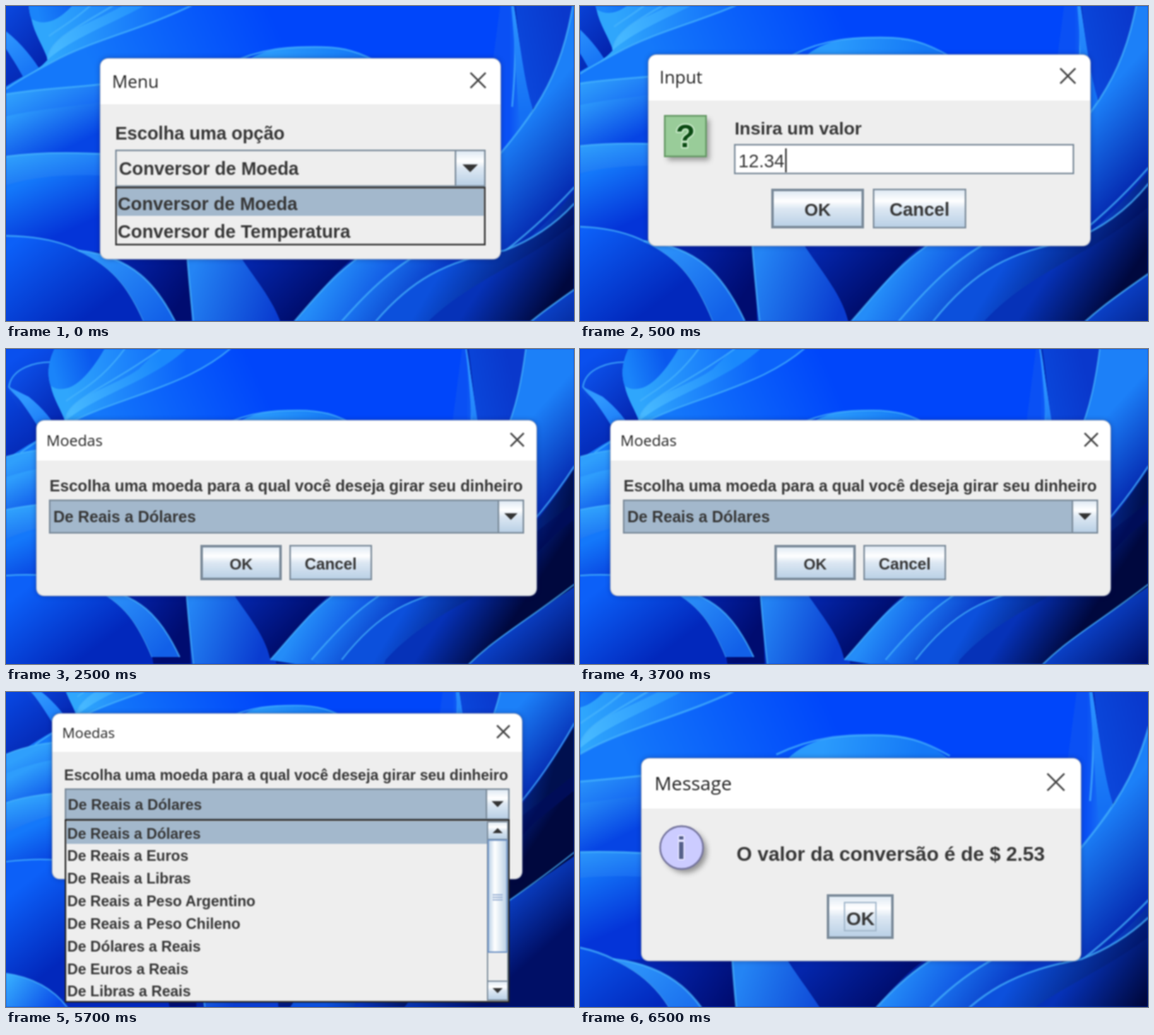
These frames come from a looping animation (900x500 px, 8 s). An HTML page:

```html
<!DOCTYPE html>
<html lang="pt">
<head>
<meta charset="utf-8">
<title>Conversor</title>
<style>
  html, body { margin: 0; width: 100%; height: 100%; overflow: hidden; background: #0440e0; }
  svg { display: block; width: 900px; height: 500px; filter: blur(.8px); }
  text { fill: #373737; font-family: "Liberation Sans", Arial, sans-serif; font-weight: 700; }
  .title { fill: #222; font-family: "Open Sans", sans-serif; font-weight: 400; }
  .plain { font-weight: 400; }
  .mid { text-anchor: middle; }
  .halo { paint-order: stroke; stroke-linejoin: round; }
</style>
</head>
<body>
<svg id="stage" viewBox="0 0 900 500" xmlns="http://www.w3.org/2000/svg"></svg>
<script>
const BORDER = '#7a8a99', PICK = '#a3b8cc', PANEL = '#eeeeee';

// Wallpaper petals: [outline, lit edge, gradient x1 y1 colour, x2 y2 colour]
const petals = [
  ['M-90 -70H100C50 10 60 60 80 130L-90 170Z', '',
    -40, -20, '#0a50ee', 60, 120, '#0424ae'],
  ['M-40 25C-30 -15 20 -25 60 -20L75 120H45C0 90 -20 60 -40 25Z', 'M60 -22C10 -28 -32 -10 -36 22C-15 50 25 75 55 108',
    -30, 0, '#0c4fe8', 60, 90, '#0424ae'],
  ['M-36 22L0 40C25 60 45 85 58 108L30 118C15 90 -10 50 -36 22Z', '',
    0, 40, '#2f98ff', 50, 110, '#1470f4'],
  ['M-90 190C-20 135 30 110 75 85C150 40 290 20 380 -70H792C812 20 815 100 800 300H-90Z', '',
    150, 130, '#1478fa', 420, 10, '#0046fa'],
  ['M792 -70C812 20 815 100 835 180L780 250L770 100Z', 'M792 -70C812 20 808 90 802 160',
    797, 60, '#0a50f4', 822, 60, '#1b78f6'],
  ['M798 -70C812 20 812 80 832 165L850 150C890 90 895 40 908 -70Z', '',
    800, 60, '#0b48dc', 890, 40, '#0a38cc'],
  ['M792 -70C812 20 815 100 835 165L815 190C806 110 808 40 792 -70Z', '',
    805, 20, '#2a90ff', 825, 170, '#1470f4'],
  ['M908 -70C890 90 860 145 770 250V440L1060 180V-70Z', 'M908 -70C890 90 860 145 770 250',
    830, 170, '#1c80f8', 940, 270, '#0220a8'],
  ['M770 420C880 330 960 240 1060 60V420Z', 'M770 405C870 330 970 230 1060 50',
    830, 340, '#0a40d0', 950, 370, '#00104f'],
  ['M-15 142C20 115 50 105 66 85C60 65 45 45 40 20C30 -10 40 -40 60 -70H390C310 20 160 40 75 88C45 104 15 120 -15 142Z', 'M390 -70C310 20 160 40 75 88C45 104 15 120 -15 142',
    70, 30, '#2fa6fc', 290, 10, '#0b62fa'],
  ['M66 85C70 40 150 25 200 -10L260 -70H310C240 10 130 30 66 85Z', 'M66 85C70 40 150 25 270 -70',
    80, 70, '#46b8ff', 250, 0, '#1a88fc'],
  ['M40 20C70 40 110 10 150 -70H60C40 -40 30 -10 40 20Z', 'M68 48C90 30 140 10 190 -70',
    50, 10, '#1a84fa', 120, -10, '#0a58ee'],
  ['M-90 170C-20 130 70 135 170 122V260H-90Z', 'M-90 170C-20 130 70 135 170 122',
    20, 135, '#2f9ffc', 70, 235, '#0a50ee'],
  ['M-90 205C0 165 70 165 170 150V250H-90Z', '',
    20, 165, '#2e9dfc', 60, 245, '#0644e4'],
  ['M-90 262C-20 232 80 230 170 236V420H-90Z', 'M-90 262C-20 232 80 230 170 236',
    20, 235, '#2f9ffc', 50, 350, '#0440ea'],
  ['M-90 325C0 270 80 265 170 270V430H-90Z', '',
    30, 280, '#1478fa', 70, 370, '#0434d8'],
  ['M-90 390C-20 360 60 365 120 390L250 385H290L300 670H-90Z', '',
    150, 400, '#0428b8', 270, 480, '#000c70'],
  ['M-90 372C0 358 70 365 115 388C175 415 200 455 225 515L250 670H-90Z', 'M-90 372C0 358 70 365 115 388C175 415 200 455 225 515',
    20, 370, '#0c60f8', 120, 500, '#0228bc'],
  ['M115 388C200 398 240 440 275 515H225C200 455 175 415 115 388Z', 'M115 388C200 398 240 440 275 515',
    150, 395, '#2c92fa', 250, 500, '#1260e8'],
  ['M-90 585C-20 590 30 620 60 670H-90Z', 'M-90 585C-20 590 30 620 60 670',
    -70, 590, '#37b0ff', 20, 660, '#0a4ae8'],
  ['M286 380H370C400 430 440 470 450 520L460 670H318C305 560 292 480 286 380Z', 'M286 380C292 470 302 550 318 670',
    300, 410, '#2484f4', 440, 460, '#0a3cd0'],
  ['M360 380H580C530 405 490 465 440 520C430 470 390 430 360 380Z', '',
    390, 400, '#0426ac', 470, 480, '#000e70'],
  ['M440 520C490 465 530 405 610 370H770L560 540Z', 'M440 520C490 465 530 405 610 370',
    520, 420, '#248cf8', 600, 470, '#0e50e0'],
  ['M515 520C570 455 620 405 690 375H780L570 560Z', 'M515 520C570 455 620 405 690 375',
    590, 420, '#1a74f0', 660, 470, '#0838c4'],
  ['M570 520C640 430 700 405 790 388C850 365 890 330 920 290L1060 180V440L760 670H470Z', 'M570 520C640 430 700 405 790 388C850 365 890 330 920 290',
    690, 420, '#0c50dc', 820, 500, '#000d58'],
  ['M650 520C740 420 850 410 960 290L1060 210V670H600Z', '',
    770, 420, '#0632b8', 860, 480, '#00083e'],
  ['M800 530C860 470 920 440 1060 340V670H690Z', 'M790 540C850 475 920 445 1060 330',
    860, 480, '#0a3fc4', 940, 570, '#000f66'],
  ['M340 140C370 68 430 65 490 65C535 65 565 72 600 100V140Z', 'M350 93C405 66 450 65 490 65C535 65 560 72 600 95',
    420, 70, '#2a9afc', 560, 95, '#1478f6'],
];

const grad = (id, pos, stops) => `<linearGradient id="${id}" ${pos}>` +
  stops.map(([o, c]) => `<stop offset="${o}" stop-color="${c}"/>`).join('') + '</linearGradient>';
const user = (x1, y1, x2, y2) => `gradientUnits="userSpaceOnUse" x1="${x1}" y1="${y1}" x2="${x2}" y2="${y2}"`;
const metal = [[0, '#dde8f3'], [.3, '#ffffff'], [.5, '#dde8f3'], [1, '#b8cfe5']];

const defs = () => '<defs>' +
  grad('base', user(300, 0, 850, 480), [[0, '#0445f4'], [.6, '#0222a4'], [1, '#000a46']]) +
  grad('metal', 'x2="0" y2="1"', metal) +
  grad('thumb', '', [[0, '#b8cfe5'], [.35, '#ffffff'], [1, '#b8cfe5']]) +
  petals.map(([, , x1, y1, a, x2, y2, b], i) => grad('p' + i, user(x1, y1, x2, y2), [[0, a], [1, b]])).join('') +
  '<filter id="soft" x="-30%" y="-30%" width="160%" height="160%"><feGaussianBlur stdDeviation="4"/></filter>' +
  '<g id="wall"><rect x="-90" y="-70" width="1150" height="740" fill="url(#base)"/>' +
  petals.map(([d, edge], i) => `<path d="${d}" fill="url(#p${i})"/>` +
    (edge ? `<path d="${edge}" fill="none" stroke="#46b4fc" stroke-width="3" opacity=".7"/>` : '')).join('') +
  '</g></defs>';

// Boxes take left, top, right, bottom; the border lies inside.
function box(l, t, r, b, fill, line = 'none', w = 0) {
  return `<rect x="${l + w / 2}" y="${t + w / 2}" width="${r - l - w}" height="${b - t - w}" fill="${fill}" stroke="${line}" stroke-width="${w}"/>`;
}
const text = (s, x, y, size, cls = '', more = '') =>
  `<text x="${x}" y="${y}" font-size="${size}" class="${cls}" ${more}>${s}</text>`;
const wall = (k, x, y) => `<use href="#wall" transform="translate(${x} ${y}) scale(${k})"/>`;
const tri = (x, y, w, h) => `<path d="M${x - w} ${y - h / 2}h${2 * w}l${-w} ${h}z" fill="#333"/>`;

function dialog(l, t, r, b, split, title, tx, ty, size, cx, cy, arm) {
  const shape = (extra) => `<rect x="${l}" y="${t}" width="${r - l}" height="${b - t}" rx="13" ${extra}/>`;
  return shape('fill="#00104a" opacity=".35" filter="url(#soft)"') + shape('fill="#fff"') +
    `<path d="M${l} ${split}H${r}V${b - 13}q0 13 -13 13H${l + 13}q-13 0 -13 -13z" fill="${PANEL}"/>` +
    shape('fill="none" stroke="#8593b0" stroke-opacity=".6" stroke-width="1.5"') +
    text(title, tx, ty, size, 'title') +
    `<path d="M${cx - arm} ${cy - arm}l${2 * arm} ${2 * arm}m0 ${-2 * arm}l${-2 * arm} ${2 * arm}" stroke="#444" stroke-width="2.8" fill="none"/>`;
}

function combo(l, t, r, b, split, fill) {
  return box(l, t, r, b, fill, BORDER, 2.4) + box(split, t, r, b, 'url(#metal)', BORDER, 2.4) +
    tri((split + r) / 2, (t + b) / 2, (r - split) / 4, (r - split) / 4);
}

function button(l, t, r, b, label, y, size, main) {
  return box(l, t, r, b, 'url(#metal)', BORDER, main ? 4 : 2.4) +
    text(label, (l + r) / 2, y, size, 'mid');
}

const menu = () => wall(1, 0, 0) +
  dialog(149, 83, 784, 402, 156, 'Menu', 168, 130, 27.5, 748, 118, 12) +
  text('Escolha uma opção', 173, 212, 28.6) +
  combo(173, 228, 760, 287, 711, PANEL) +
  text('Conversor de Moeda', 179, 268, 28.8) +
  box(173, 287, 760, 380, PANEL, '#333', 2.6) +
  box(176, 290, 757, 333, PICK) +
  text('Conversor de Moeda', 177, 324, 28.8) +
  text('Conversor de Temperatura', 177, 368, 29);

const input = () => wall(1, -14, -15) +
  dialog(108, 77, 809, 381, 150, 'Input', 126, 123, 27.5, 773, 111, 12) +
  '<rect x="139" y="180" width="66" height="65" fill="#555" opacity=".55" filter="url(#soft)"/>' +
  box(133, 173, 201, 240, '#99cc99', '#669966', 2.6) +
  text('?', 167, 224, 50, 'mid halo', 'style="fill:#0a4a12" stroke="#c4e6c4" stroke-width="5"') +
  text('Insira um valor', 245, 204, 28.3) +
  box(244, 219, 783, 267, '#fff', BORDER, 2.4) +
  text('12.34', 251, 256, 29.2, 'plain') +
  box(325, 226, 327.5, 264, '#333') +
  button(303, 290, 450, 353, 'OK', 333, 28, true) +
  button(464, 290, 612, 353, 'Cancel', 333, 29);

const QUESTION = 'Escolha uma moeda para a qual você deseja girar seu dinheiro';

const coins = () => wall(.87, 36, 41) +
  dialog(48, 113, 841, 392, 177, 'Moedas', 64, 154, 24, 810, 144, 10.5) +
  text(QUESTION, 69, 226, 25.08) +
  combo(68, 239, 821, 293, 779, PICK) +
  text('De Reais a Dólares', 75, 275, 25.1) +
  button(308, 311, 437, 367, 'OK', 350, 24.5, true) +
  button(449, 311, 580, 367, 'Cancel', 350, 25.2);

function list() {
  const rows = ['Reais a Dólares', 'Reais a Euros', 'Reais a Libras', 'Reais a Peso Argentino',
    'Reais a Peso Chileno', 'Dólares a Reais', 'Euros a Reais', 'Libras a Reais'];
  const grip = [321, 325, 329].map(y => box(771, y, 787, y + 1.8, '#8fa9cf')).join('');
  return wall(.815, 57.7, -31.6) +
    dialog(73, 34, 818, 297, 95, 'Moedas', 89, 73, 22.5, 788, 63, 10) +
    text(QUESTION, 92, 140, 23.54) +
    combo(93, 153, 798, 203, 760, PICK) +
    text('De Reais a Dólares', 98, 187, 23.6) +
    box(93, 202, 798, 493, PANEL, '#222', 2.4) +
    box(96, 205, 762, 241, PICK) +
    rows.map((s, i) => text('De ' + s, 97, 232.5 + 35.85 * i, 23.5)).join('') +
    box(762, 205, 796, 490, PANEL, BORDER, 2) +
    box(762, 205, 796, 235, 'url(#metal)', BORDER, 2) + tri(779, 220, 8, -8) +
    box(762, 458, 796, 490, 'url(#metal)', BORDER, 2) + tri(779, 474, 8, 8) +
    box(763, 234, 795, 414, 'url(#thumb)', '#6f93c4', 2.2) + grip;
}

const message = () => wall(1.1, -74, -3) +
  dialog(97, 105, 794, 427, 185, 'Message', 118, 156, 30, 754, 143, 13.5) +
  '<circle cx="167" cy="253" r="34" fill="#555" opacity=".6" filter="url(#soft)"/>' +
  '<circle cx="161" cy="247" r="34" fill="#ccccff" stroke="#77779f" stroke-width="2.8"/>' +
  text('i', 160.5, 265, 50, 'mid halo', 'style="fill:#55608a" stroke="#e6e6ff" stroke-width="4"') +
  text('O valor da conversão é de $ 2.53', 248, 268, 31.5) +
  button(391, 321, 497, 392, '', 0, 0, true) +
  box(418, 333, 470, 380, 'none', PICK, 2.2) +
  text('OK', 444.5, 370, 30, 'mid');

// Scene and the time at which it cuts in
const steps = [[0, menu], [500, input], [2500, coins], [4500, list], [6500, message]];
const LOOP = 8000;

const stage = document.getElementById('stage');
stage.innerHTML = defs() + steps.map(([, draw]) => `<g class="scene" display="none">${draw()}</g>`).join('');
const scenes = [...stage.querySelectorAll('.scene')];

const start = performance.now();
let shown = -1;
function tick() {
  const t = (performance.now() - start) % LOOP;
  const now = steps.filter(([at]) => at <= t).length - 1;
  if (now !== shown) {
    scenes.forEach((g, i) => g.setAttribute('display', i === now ? 'inline' : 'none'));
    shown = now;
  }
  requestAnimationFrame(tick);
}
tick();
</script>
</body>
</html>
```
